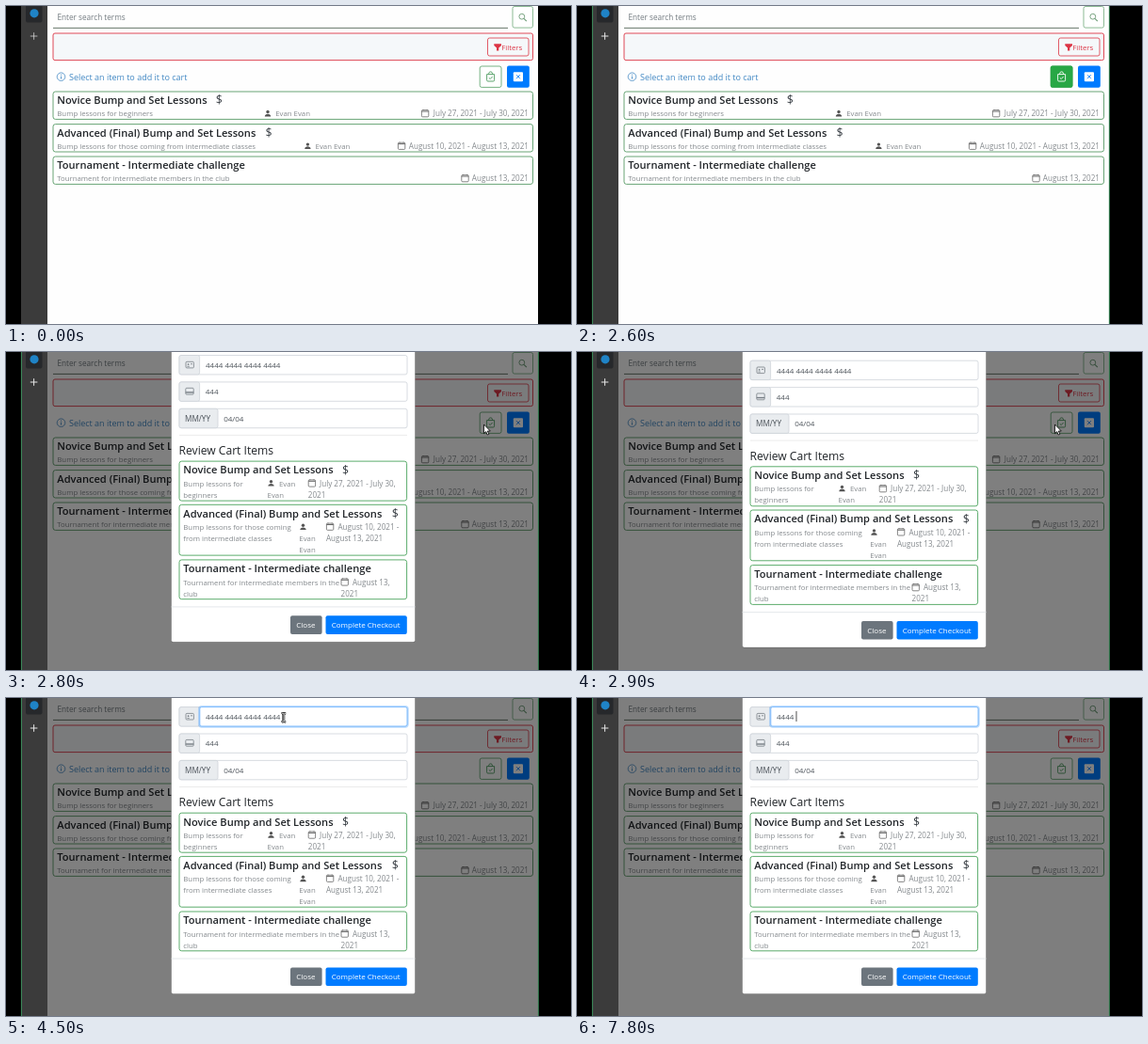
Animation, 600 px wide and 338 px high, one loop 8 s. Source, as an HTML page:

```html
<!DOCTYPE html>
<html lang="en">
<head>
<meta charset="utf-8">
<title>Cart checkout</title>
<style>
  html, body { margin: 0; width: 100%; height: 100%; overflow: hidden; background: #000; }
  svg { display: block; width: 600px; height: 338px; }
  text { font-family: "Open Sans", "Noto Sans", sans-serif; white-space: pre; }
</style>
</head>
<body>
<svg id="stage" viewBox="0 0 600 338" xmlns="http://www.w3.org/2000/svg"></svg>
<script>
const LOOP = 8000;
const GREEN = '#28a745', RED = '#dc3545', BLUE = '#007bff';
const INK = '#212529', MUTED = '#84898d', FIELD = '#495057';
const CARD_NUMBER = '4444 4444 4444 4444';

// Markup helpers
const text = (x, y, s, size = 7.8, fill = MUTED, extra = '') =>
  `<text x="${x}" y="${y}" font-size="${size}" fill="${fill}" ${extra}>${s}</text>`;
const rect = (x, y, w, h, fill, stroke = 'none', r = 2, extra = '') =>
  `<rect x="${x}" y="${y}" width="${w}" height="${h}" rx="${r}" fill="${fill}" stroke="${stroke}" ${extra}/>`;
const line = (d, stroke, w = 1, extra = '') =>
  `<path d="${d}" fill="none" stroke="${stroke}" stroke-width="${w}" ${extra}/>`;
const at = (x, y, s) => `<g transform="translate(${x} ${y})">${s}</g>`;

const title = (x, y, s) => text(x, y, s, 11.1, INK, 'font-weight="600"');
const dollar = (x, y) => text(x, y, '$', 12.4, '#343a40');
const date = (x, y, s, anchor = 'start') => text(x, y, s, 8.1, MUTED, `text-anchor="${anchor}"`);
const person = (x, y) => at(x, y,
  `<circle cy="-1.7" r="1.7" fill="#555"/><path d="M-3.2 3.2C-3.2-.4 3.2-.4 3.2 3.2Z" fill="#555"/>`);
const calendar = (x, y) => at(x, y,
  rect(.4, .6, 7.4, 7.2, 'none', '#666', 1, 'stroke-width=".8"') + line('M.4 2H7.8', '#666', 1) +
  line('M2 0V1M6.2 0V1', '#666', .8));
const button = (x, y, w, h, fill, s, tx) =>
  rect(x, y, w, h, fill) + text(tx, y + 12.7, s, 8, '#fff');

const bag = color => at(514.6, 75.4,
  line('M-4-2.8H4V3.4Q4 4.6 2.8 4.6H-2.8Q-4 4.6-4 3.4ZM-1.9-2.8V-3.6A1.9 1.9 0 0 1 1.9-3.6V-2.8', color, .9) +
  line('M-1.8 .9L-.4 2.2L2-.4', color, .9));

const listCard = (y, name, desc, cash, who, icon, when) =>
  rect(50, y, 509.5, 29.4, '#fff', '#579a66', 2.5, 'stroke-width=".9"') +
  title(54.3, y + 13, name) + text(54.3, y + 26.2, desc) +
  (cash ? dollar(cash, y + 13.3) : '') +
  (who ? person(who, y + 23.2) + text(who + 8.2, y + 26.2, 'Evan Evan') : '') +
  calendar(icon, y + 19) + date(555, y + 26.2, when, 'end');

const page =
  rect(44, 0, 521, 338, '#fefefe', 'none', 0) +
  text(54.5, 15, 'Enter search terms', 8.2, '#737b80') +
  line('M50 23.4H533', '#69786c', 1) +
  rect(538, .5, 21.5, 22.6, '#fff', '#7fb48a', 2, 'stroke-width=".9"') +
  `<circle cx="547.8" cy="11.2" r="2.9" fill="none" stroke="#6d9b77" stroke-width=".9"/>` +
  line('M550 13.4L552.8 16.2', '#6d9b77', 1.1) +
  rect(50, 29, 509.5, 28.6, '#f5f8fa', RED, 2, 'stroke-width=".9"') +
  rect(511.5, 34, 43.5, 19, 'none', RED, 2, 'stroke-width=".8"') +
  `<path d="M518.3 40.3H526V42L523.3 44.6V47.6H521V44.6L518.3 42Z" fill="${RED}"/>` +
  text(526.2, 46.8, 'Filters', 7.8, RED) +
  `<circle cx="58.5" cy="75.2" r="4.3" fill="none" stroke="#4389c4" stroke-width=".8"/>` +
  line('M58.5 74.6V77.6M58.5 72.6V73.6', '#4389c4', .9) +
  text(67, 78.6, 'Select an item to add it to cart', 9, '#4389c4') +
  rect(503.2, 64, 22.8, 22.4, '#fff', '#67a975', 2, 'stroke-width=".9"') + bag('#4c9a5e') +
  `<g id="hover">${rect(502.8, 63.6, 23.6, 23.2, GREEN) + bag('#fff')}</g>` +
  rect(532, 63.6, 23.8, 23.2, BLUE) + rect(538.8, 70.2, 10.2, 10, '#fff', 'none', 1) +
  line('M542 73.2L545.9 77.2M545.9 73.2L542 77.2', BLUE, .9) +
  listCard(91, 'Novice Bump and Set Lessons', 'Bump lessons for beginners',
    222.8, 278, 441, 'July 27, 2021 - July 30, 2021') +
  listCard(125.6, 'Advanced (Final) Bump and Set Lessons',
    'Bump lessons for those coming from intermediate classes',
    275.6, 320.4, 416, 'August 10, 2021 - August 13, 2021') +
  listCard(160, 'Tournament - Intermediate challenge',
    'Tournament for intermediate members in the club', 0, 0, 483.4, 'August 13, 2021');

const fieldRow = (y, split, value) =>
  rect(184, y, 242, 20.4, '#fff', '#ced4da', 2, 'stroke-width=".8"') +
  rect(184, y, split - 184, 20.4, '#e9ecef', '#ced4da', 2, 'stroke-width=".8"') +
  (value ? text(split + 6.2, y + 13.4, value, 8, FIELD) : '');
const idIcon = color => rect(191, 16.4, 8.4, 6.6, 'none', color, 1, 'stroke-width=".8"') +
  `<circle cx="193.6" cy="19.2" r=".9" fill="${color}"/>` +
  line('M192.4 21.4H194.8M196 18.8H198', color, .8);
const cartCard = (y, h, name, cash) =>
  rect(184, y, 241.6, h, '#fff', '#4aa35c', 2.5, 'stroke-width=".9"') +
  title(188.3, y + 13.3, name) + (cash ? dollar(cash, y + 13.6) : '');

const modal =
  rect(175.5, -60, 259, 374.4, '#fff', '#0003', 2) +
  fieldRow(9.6, 205.6) + `<g id="okIcon">${idIcon('#777e85')}</g>` +
  `<g id="bad">${rect(183.8, 9.4, 21.6, 20.8, RED) + idIcon('#fff')}</g>` +
  `<g id="focus">${rect(205.8, 9.6, 220.2, 20.4, 'none', BLUE, 2, 'stroke-width="3.4" stroke-opacity=".25"') +
    rect(205.8, 9.6, 220.2, 20.4, '#fff', '#80bdff', 2)}</g>` +
  text(212, 23, '', 8, FIELD, 'id="number"') +
  `<g clip-path="url(#selClip)">${rect(212, 14, 79.5, 11.5, '#0078d7', 'none', 0) +
    text(212, 23, CARD_NUMBER, 8, '#fff')}</g>` +
  rect(0, 14, .8, 11, '#222', 'none', 0, 'id="caret"') +
  fieldRow(38, 205.6, '444') +
  rect(190.8, 44.4, 8.4, 6.8, 'none', '#777e85', 1, 'stroke-width=".8"') +
  line('M190.8 49H199.2', '#777e85', 1.4) +
  fieldRow(66.4, 225, '04/04') + text(190, 79.6, 'MM/YY', 8.2, FIELD) +
  line('M184 94.5H426', '#e6e6e6', .8) +
  text(183.6, 115, 'Review Cart Items', 12.1, INK) +
  cartCard(122.2, 42, 'Novice Bump and Set Lessons', 357) +
  text(188.3, 148.7, 'Bump lessons for') + text(188.3, 160.7, 'beginners') +
  person(281.5, 145.5) + text(290, 148.7, 'Evan') + text(277.6, 160.7, 'Evan') +
  calendar(320.8, 141.4) + date(333, 148.7, 'July 27, 2021 - July 30,') + date(320.8, 160.7, '2021') +
  cartCard(168.4, 53.8, 'Advanced (Final) Bump and Set Lessons', 409.8) +
  text(188.3, 195, 'Bump lessons for those coming') + text(188.3, 207, 'from intermediate classes') +
  person(315.5, 192) + text(311.3, 207, 'Evan') + text(311.3, 219, 'Evan') +
  calendar(340, 187.6) + date(352.4, 195, 'August 10, 2021 -') + date(340, 207, 'August 13, 2021') +
  cartCard(227, 41.8, 'Tournament - Intermediate challenge') +
  text(188.3, 253.6, 'Tournament for intermediate members in the') + text(188.3, 265.6, 'club') +
  calendar(355.6, 246.4) + date(368, 253.6, 'August 13,') + date(355.6, 265.6, '2021') +
  line('M175.5 277H434.5', '#dee2e6', .8) +
  button(302, 286.4, 33.6, 19.6, '#6c757d', 'Close', 308.3) +
  button(339.5, 286.4, 86.3, 19.6, BLUE, 'Complete Checkout', 345.7);

const beamPath = 'M-2-4.5Q0-4.5 0-3.5Q0-4.5 2-4.5M0-3.5V3.5M-2 4.5Q0 4.5 0 3.5Q0 4.5 2 4.5';
const TRAIL = 6, TRAIL_GAP = 20;

const $ = id => document.getElementById(id);
$('stage').innerHTML =
  `<defs><clipPath id="selClip"><rect id="sel" x="212" y="13" width="0" height="14"/></clipPath></defs>` +
  rect(0, 0, 600, 338, '#000', 'none', 0) +
  rect(16, 0, 28, 338, '#3b3b3b', 'none', 0) +
  rect(21, -3, 17.5, 20.5, '#26282b') + `<circle cx="30" cy="7.8" r="4.6" fill="#1f83c6"/>` +
  line('M25.8 32H33.4M29.6 28.2V35.8', '#e6e6e6', 1, 'id="plus"') +
  page + rect(44, 0, 521, 338, '#000', 'none', 0, 'id="backdrop"') +
  `<g id="modal">${modal}</g>` +
  line('M16.4 0V338M565.3 0V338', '#3f9a63', .9, 'id="edges"') +
  `<path id="arrow" d="M0 0V9.6L2.2 7.6L3.7 11L5.3 10.3L3.8 7H6.8Z" fill="#fff" stroke="#000" stroke-width=".8"/>` +
  Array.from({ length: TRAIL }, (_, i) =>
    `<g id="beam${i}">${line(beamPath, '#333', 2) + line(beamPath, '#fff', .7)}</g>`).join('');

// Timing
const clamp = v => Math.min(1, Math.max(0, v));
const ramp = (t, start, len) => clamp((t - start) / len);

// cubic-bezier(0, 0, .58, 1)
function easeOut(x) {
  let lo = 0, hi = 1;
  for (let i = 0; i < 20; i++) {
    const u = (lo + hi) / 2;
    if (1.74 * u * u * (1 - u) + u ** 3 < x) lo = u; else hi = u;
  }
  return lo * lo * (3 - 2 * lo);
}

// [time, x, y] of the pointer
const PATH = [
  [3250, 507.5, 77], [3500, 376, 54], [3520, 352, 50.3], [3540, 342, 48.3],
  [3600, 327, 44.8], [3700, 322, 44], [3850, 322, 44], [4100, 297, 22],
  [4600, 294, 20], [5050, 210, 20]
];
function pointer(t) {
  if (t <= PATH[0][0]) return PATH[0].slice(1);
  for (let i = 1; i < PATH.length; i++) {
    const a = PATH[i - 1], b = PATH[i];
    if (t < b[0]) {
      const k = (t - a[0]) / (b[0] - a[0]);
      return [a[1] + (b[1] - a[1]) * k, a[2] + (b[2] - a[2]) * k];
    }
  }
  return PATH[PATH.length - 1].slice(1);
}

const set = (id, name, value) => $(id).setAttribute(name, value);
const alpha = (id, v) => set(id, 'opacity', v);

function render(t) {
  alpha('plus', .7 + .3 * ramp(t, 50, 100));
  alpha('hover', ramp(t, 960, 150) - ramp(t, 2690, 100));
  alpha('edges', ramp(t, 2450, 50));

  const fade = ramp(t, 2630, 150);
  alpha('backdrop', fade / 2);
  alpha('modal', fade);
  set('modal', 'transform', `translate(0 ${-25 * (1 - easeOut(ramp(t, 2630, 300)))})`);

  alpha('focus', ramp(t, 4250, 150));
  const bad = ramp(t, 5360, 120) - ramp(t, 6560, 120);
  alpha('bad', bad);

  const typed = t < 6600 ? 0 : Math.min(5, 1 + Math.floor((t - 6600) / 300));
  $('number').textContent = t < 5400 ? CARD_NUMBER : '4444 '.slice(0, typed);

  const [px, py] = pointer(t);
  const selecting = t >= 4600 && t < 5400;
  const from = Math.max(212, px);
  set('sel', 'x', from);
  set('sel', 'width', selecting ? Math.max(0, 291.5 - from) : 0);

  set('caret', 'x', 212 + 4.57 * Math.min(typed, 4) + (typed > 4 ? 2.1 : 0) + .2);
  alpha('caret', (t >= 5400 && t < 6000) || t >= 6600 ? 1 : 0);

  const shown = t >= 2650 && t < 5400;
  alpha('arrow', shown && px > 430 ? 1 : 0);
  set('arrow', 'transform', `translate(${px} ${py})`);
  for (let i = 0; i < TRAIL; i++) {
    const [x, y] = pointer(t - i * TRAIL_GAP);
    alpha('beam' + i, shown && px <= 430 && x <= 430 ? 1 : 0);
    set('beam' + i, 'transform', `translate(${x} ${y})`);
  }
}

const begin = performance.now();
function tick() {
  render((performance.now() - begin) % LOOP);
  requestAnimationFrame(tick);
}
render(0);
requestAnimationFrame(tick);
</script>
</body>
</html>
```
